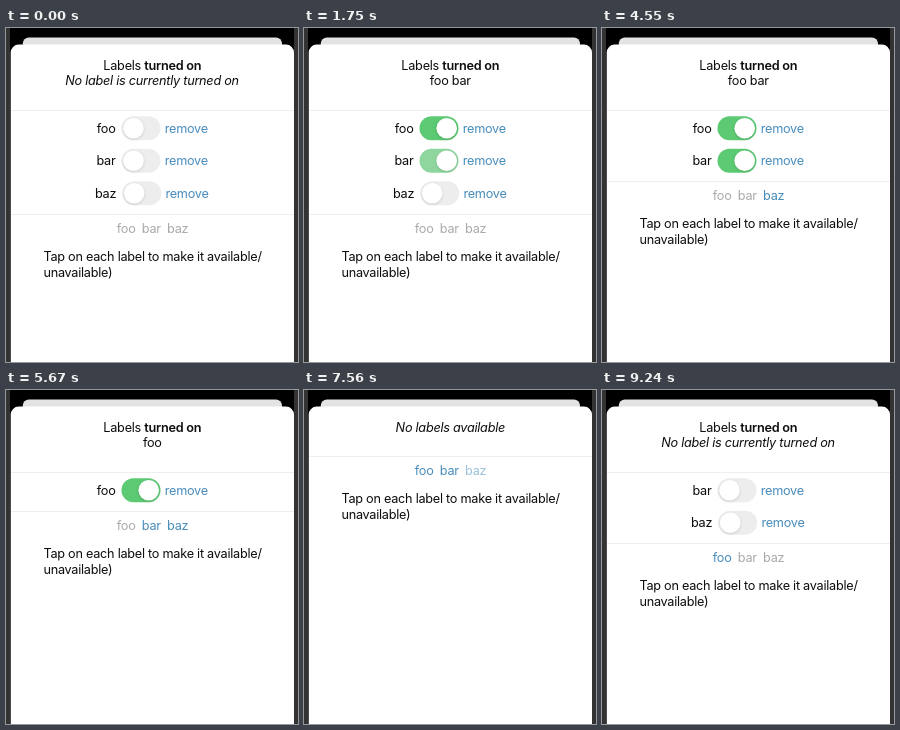
These frames come from a looping animation (292x334 px, 9450 ms). An HTML page with a canvas:

```html
<!DOCTYPE html>
<html lang="en">
<head>
<meta charset="utf-8">
<title>Labels</title>
<style>
  html, body { margin: 0; width: 100%; height: 100%; overflow: hidden; background: #000; }
  canvas { display: block; width: 292px; height: 334px; }
</style>
</head>
<body>
<canvas id="stage"></canvas>
<script>
const W = 292, H = 334, LOOP = 9450, TICK = 70;
const NAMES = ['foo', 'bar', 'baz'];
const LIST_X = { foo: 110.8, bar: 135.8, baz: 161 };
const TURNED_ON = { foo: 700, bar: 1540, baz: 2450 };
const REMOVED = { baz: 4550, bar: 5530, foo: 6580 };
const PRESSED = { baz: 7560, bar: 8960, foo: Infinity };

const BLACK = [14, 14, 14], BLUE = [72, 140, 188], GRAY = [170, 170, 170];
const WHITE = [255, 255, 255], OFF = [237, 237, 238], GREEN = [92, 201, 115];
const FONT = '12.7px Inter, "Liberation Sans", sans-serif';

const canvas = document.getElementById('stage');
const ctx = canvas.getContext('2d');
const dpr = window.devicePixelRatio || 1;
canvas.width = W * dpr;
canvas.height = H * dpr;
ctx.scale(dpr, dpr);

const clamp = v => Math.min(1, Math.max(0, v));
const smooth = v => { v = clamp(v); return v * v * (3 - 2 * v); };
const rgb = c => `rgb(${c.map(Math.round).join(',')})`;
const mix = (a, b, k) => a.map((v, i) => v + (b[i] - v) * k);

function setFont(style = '') {
  ctx.font = `${style} ${FONT}`;
  ctx.letterSpacing = '-0.26px';
}

function text(str, x, y, { color = BLACK, style = '', align = 'left' } = {}) {
  setFont(style);
  ctx.textAlign = align;
  ctx.fillStyle = rgb(color);
  ctx.fillText(str, x, y);
}

function box(x, y, w, h, radius, fill) {
  ctx.fillStyle = fill;
  ctx.beginPath();
  ctx.roundRect(x, y, w, h, radius);
  ctx.fill();
}

function divider(y) {
  ctx.fillStyle = '#eeeeee';
  ctx.fillRect(5, y, 283, 1);
}

function drawSheet() {
  ctx.fillStyle = '#333';
  ctx.fillRect(0, 0, W, H);
  ctx.fillStyle = '#000';
  ctx.fillRect(4, 0, 284, H);
  box(16.8, 9.5, 259.2, 30, 6, '#e3e3e3');
  box(4.7, 16.6, 283.3, 340, 8, '#fff');
}

function drawHeader(active) {
  setFont();
  const lead = ctx.measureText('Labels ').width;
  setFont('600');
  const left = 146.3 - (lead + ctx.measureText('turned on').width) / 2;
  text('Labels ', left, 41.5);
  text('turned on', left + lead, 41.5, { style: '600' });
  if (active.length) text(active.join(' '), 146.3, 57, { align: 'center' });
  else text('No label is currently turned on', 146, 57, { style: 'italic', align: 'center' });
}

function drawToggle(x, y, since) {
  const slide = smooth((since + 40) / 210);
  const tint = smooth(since / 350);
  const stretch = 4 * Math.sin(Math.PI * slide);
  box(x, y - 12, 39, 24, 12, rgb(mix(OFF, GREEN, tint)));
  const knob = 20.6 + stretch;
  ctx.save();
  ctx.shadowColor = 'rgba(0,0,0,0.14)';
  ctx.shadowBlur = 3 * dpr;
  ctx.shadowOffsetY = dpr;
  box(x + 1.7 + slide * (35.8 - knob), y - 10.3, knob, 20.6, 10.3, '#fff');
  ctx.restore();
}

function drawRow(name, index, since) {
  const y = 100.2 + 32.5 * index;
  const shift = name === 'baz' ? 0.7 : 0;
  text(name, 109.5 + shift, y + 4.5, { align: 'right' });
  drawToggle(115.5 + shift, y, since);
  text('remove', 158.7 + shift, y + 4.5, { color: BLUE });
}

function listColor(name, t, available) {
  if (t < REMOVED[name]) return GRAY;
  const touched = t - PRESSED[name];
  if (touched < 0) return BLUE;
  const pale = mix(BLUE, WHITE, 0.45);
  return available ? mix(pale, GRAY, clamp(touched / 210)) : pale;
}

function draw(t) {
  const restored = name => t >= PRESSED[name] + TICK;
  const since = name => t < REMOVED[name] ? t - TURNED_ON[name] : -1000;
  const available = NAMES.filter(n => t < REMOVED[n] || restored(n));
  const active = available.filter(n => since(n) >= TICK);

  drawSheet();
  let bottom = 66;
  if (available.length) {
    drawHeader(active);
    divider(82);
    available.forEach((n, i) => drawRow(n, i, since(n)));
    bottom = Math.round(88.4 + 32.5 * available.length);
  } else {
    text('No labels available', 146.3, 41.5, { style: 'italic', align: 'center' });
  }

  divider(bottom);
  for (const n of NAMES) {
    text(n, LIST_X[n], bottom + 19, { color: listColor(n, t, available.includes(n)) });
  }
  text('Tap on each label to make it available/', 37.4, bottom + 46.5);
  text('unavailable)', 37.4, bottom + 63.3);
}

const start = performance.now();
function frame() {
  const t = (performance.now() - start) % LOOP;
  draw(Math.floor(t / TICK) * TICK);
  requestAnimationFrame(frame);
}
frame();
</script>
</body>
</html>
```
